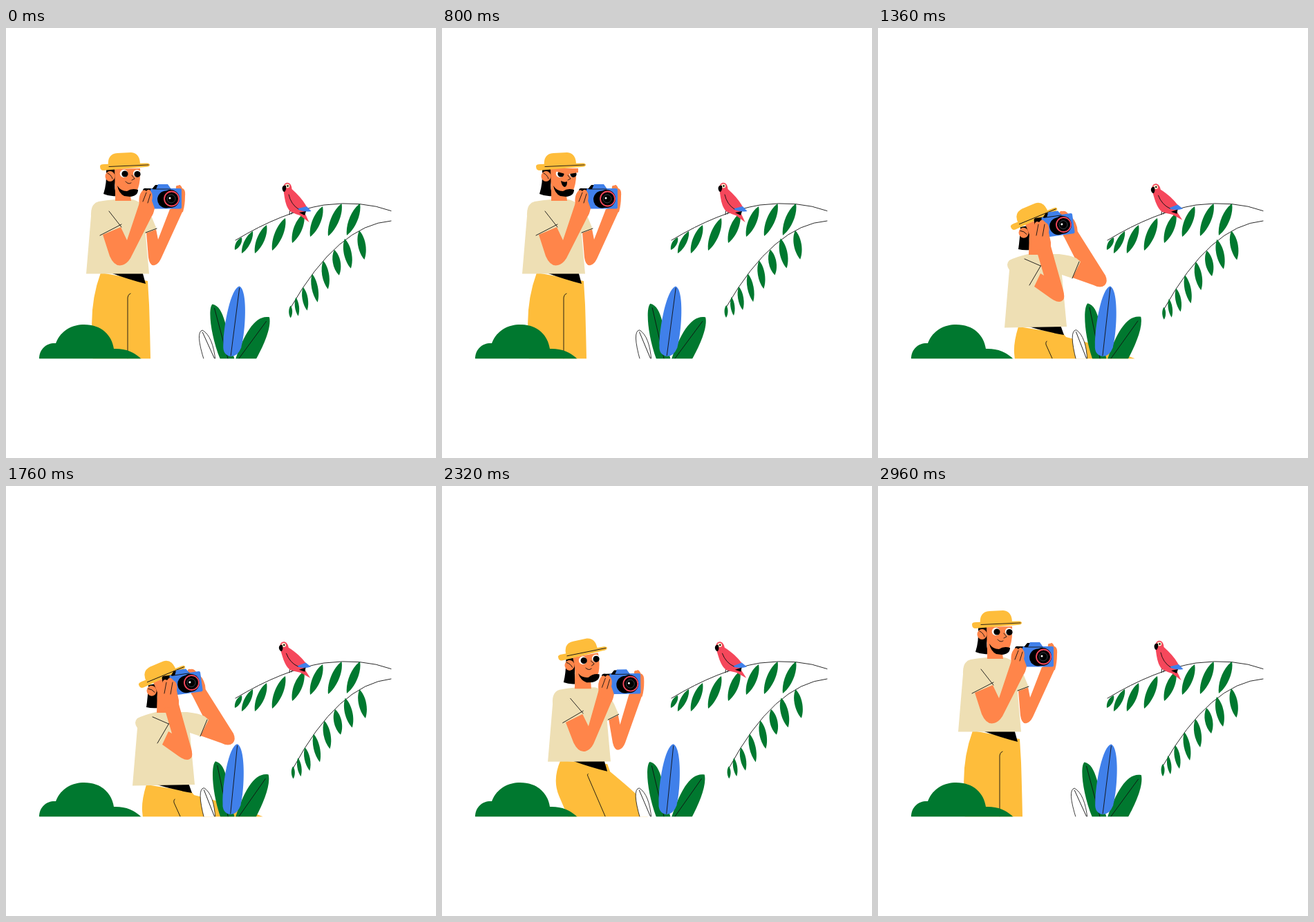
Animation of 622 by 622 pixels, one loop 3040 ms. Source, as an HTML page:

```html
<!DOCTYPE html>
<html lang="en">
<head>
<meta charset="utf-8">
<title>Bird photographer</title>
<style>
html, body { margin: 0; width: 100%; height: 100%; overflow: hidden; background: #fff; }
svg { display: block; width: 100vw; height: 100vh; }
.line { fill: none; stroke: #111; stroke-width: .9; stroke-linecap: round; }
.skin { fill: #ff854a; }
.sun { fill: #febd3b; }
.cream { fill: #eedfb4; }
.green { fill: #00782f; }
.blue { fill: #4080ea; }
.red { fill: #f5475b; }
.white { fill: #fff; }
</style>
</head>
<body>
<svg viewBox="0 0 622 622">
  <defs><clipPath id="ground"><rect width="622" height="478.3"/></clipPath></defs>
  <g clip-path="url(#ground)">
    <g id="person">
      <path id="pants" class="sun"/>
      <path id="pantsLine" class="line"/>
      <path id="belt"/>
      <path id="farArm" class="skin"/>
      <path id="shirt" class="cream"/>
      <path id="farHem" class="line"/>
      <path id="hair"/>
      <path id="neck" class="skin"/>
      <g id="head">
        <path id="face" class="skin"/>
        <ellipse class="skin" cx="150.500" cy="214.500" rx="7" ry="7.500"/>
        <path class="line" d="M147 210Q152 212 154 218"/>
        <g id="features">
          <path d="M161 228Q166 236 175 236Q182 231 191 234Q191 243 179 244L171 243Q163 239 161 228Z"/>
          <g id="eyes">
            <circle class="white" cx="170.500" cy="210.500" r="5.800"/>
            <circle class="white" cx="189.500" cy="210.500" r="5.500"/>
            <circle cx="172" cy="211" r="4.600"/>
            <circle cx="190" cy="211.500" r="4.600"/>
          </g>
          <path id="lids" class="skin" d="M163 203H197V209L185 211L181 210L178 211L163 207Z"/>
          <path class="line" d="M182 213L186 218L182 220"/>
          <path id="smile" class="line" d="M173 222Q177 227 181 224"/>
          <path id="laugh" d="M172 221Q177 224 181 222Q181 230 177 230Q173 228 172 221Z"/>
        </g>
        <path class="sun" d="M148 200Q146 182 161 181L181 180Q194 181 194 198Z"/>
        <path class="sun" d="M136 200Q136 197 142 197L204 195.500Q208 196 208 198Q208 201 201 201L141 206Q136 206 136 200Z"/>
        <path class="line" d="M149 200.500L206 198"/>
      </g>
      <path id="farHand" class="skin"/>
      <g id="camera">
        <path d="M198 234Q199 231 204 232H212V242H198Z"/>
        <rect class="blue" x="209" y="232" width="45" height="29.500" rx="2"/>
        <path d="M211 233L216 227H223V233Z"/>
        <path class="blue" d="M217 233L220 226H234L239 233Z"/>
        <path class="line" d="M213 233H238"/>
        <circle cx="231.500" cy="248" r="12.500"/>
        <circle cx="238" cy="247" r="13"/>
        <circle cx="239.500" cy="247" r="10.500" fill="none" stroke="#f5475b" stroke-width="1.800"/>
        <circle cx="239" cy="247" r="6" fill="none" stroke="#46515c" stroke-width=".8"/>
        <circle class="white" cx="237" cy="246" r="1.500"/>
      </g>
      <path id="nearHem" class="line"/>
      <path id="nearArm" class="skin"/>
      <path id="nearHand" class="skin"/>
      <path id="fingers" class="line"/>
    </g>

    <path class="green" d="M48 479C48 463 60 455 72 456C80 436 97 429 113 429C138 429 153 444 156 464Q180 463 196 479Z"/>

    <g id="paleLeaf">
      <path d="M287 482Q274 439 285 437Q300 446 303 482Z" fill="#fff" stroke="#111" stroke-width=".8"/>
      <path class="line" d="M285 440L301.500 478"/>
    </g>
    <g id="leftLeaf">
      <path class="green" d="M300 399C293 406 297 448 312 484H332C319 440 319 403 300 399Z"/>
      <path class="line" d="M303 405L321 478"/>
    </g>
    <g id="rightLeaf">
      <path class="green" d="M380.500 418C360 414 344 442 331 482H360C371 462 384 434 380.500 418Z"/>
      <path class="line" d="M376 424L337 478"/>
    </g>
    <g id="blueLeaf">
      <path class="blue" d="M336.500 373.500C349 379 346 440 340 462Q335 475 325 475Q313 473 314 459C314 430 324 376 336.500 373.500Z"/>
      <path class="line" d="M336.500 376L325 474"/>
    </g>

    <path class="line" d="M332 307Q400 266 460 256Q515 249 557 264.500"/>
    <g id="upperLeaves" class="green"></g>
    <g id="lowerBranch">
      <path class="line" d="M412 405Q480 285 557 279"/>
      <g id="lowerLeaves" class="green"></g>
    </g>

    <path class="line" d="M411 261L410 270M414 263L413 269"/>
    <g id="bird">
      <path class="red" d="M401 231C402 221 413 221 413.500 233C424 242 432 252 436 261L432 267L438.500 281L425 271Q418 269 411 265C404 258 403 246 401 231Z"/>
      <path class="blue" d="M421 261.500L435 258L441.500 265Q430 267 421 261.500Z"/>
      <path d="M424 267L434 265L432 271Z"/>
      <path class="line" d="M409 241Q412 255 423 262"/>
      <ellipse cx="407" cy="228.500" rx="3.300" ry="3" fill="#fff0d0"/>
      <circle cx="407.500" cy="228.500" r="1.200"/>
      <path d="M405 228Q400 227 399.500 232Q400 237 403 237Q406 234 405 228Z"/>
    </g>
  </g>
</svg>
<script>
const LOOP = 3040, STEP = 80;
const SHIFT = [67, 78]; // how far the body travels from standing to crouching
const el = id => document.getElementById(id);
const clamp = x => Math.min(1, Math.max(0, x));
const ease = x => (x = clamp(x), x < .5 ? 4 * x ** 3 : 1 - 4 * (1 - x) ** 3);
const ramp = (t, from, to) => ease((t - from) / (to - from));
const numbers = d => d.match(/-?[\d.]+/g).map(Number);

// Rewrites each coordinate of a path; x and y alternate.
function remap(path, fn) {
  let i = 0;
  return path.replace(/-?[\d.]+/g, n => fn(+n, i++).toFixed(2));
}

// [standing, crouching]
const armPoses = {
  belt: ['M151 352L197 352L202 370Q178 364 151 354Z',
         'M218 430L264 430L269 444Q245 440 218 432Z'],
  farArm: ['M203 296L206 332Q208 345 215 343Q220 342 224 334L256 264L237 262L220 306L217 291Z',
           'M281 361L312 372Q322 377 328 372Q333 367 329 358L288 293L268 300L291 345L291 340Z'],
  shirt: ['M116 355.500L123 272Q122 254 134 251Q145 249 158 248L183 248Q200 252 211 274L218 291L202 297L202 299L207 355.500Z',
          'M183 433.500L190 350Q184 342 190 336Q200 331 217 327L262 327Q280 329 287 333L293 338L281 362L266 357L273 432Z'],
  farHem: ['M202 296L218 290', 'M281 362L291 338'],
  farHand: ['M237 263Q244 258 245 248L246 233Q245 227 249 228Q252 225 255 232Q260 233 259 243Q259 256 256 266L240 270Z',
            'M268 301Q267 292 266 282L263 269Q262 264 267 265Q272 264 276 270Q285 276 288 288Q289 293 288 296L274 306Z'],
  nearHem: ['M149 265L167 288M136 300L167 284', 'M212 334L235 344M219 372L236 343'],
  nearArm: ['M140 299L150 330Q157 346 168 343Q175 341 180 333L213 268L194 250L175 307L166 288Z',
            'M226 374L250 391Q262 399 267 394Q271 391 268 380L249 312L227 314L240 358L235 355Z'],
  nearHand: ['M193 256Q191 244 196 237Q199 232 203 236Q207 231 210 237Q213 241 211 250L215 261Q214 267 211 272L191 262Z',
             'M226 308Q222 297 226 285Q228 278 233 281Q237 274 242 281Q249 284 247 296L250 310Q250 316 250 320L229 321Z'],
  fingers: ['M198 251L203 238M205 253L209 240', 'M229 300L232 284M238 301L241 284']
};
const headPoses = {
  hair: ['M145 204L161 204L158 222Q156 232 160 243Q150 244 141 240Q146 225 145 204Z',
         'M206 288L222 285L219 300Q218 311 221 321Q211 322 203 320Q205 306 206 288Z'],
  neck: ['M158 225L178 225L181 250L158 250Z', 'M219 295L243 295L243 328L218 328Z']
};
const faces = ['M157 204L194 203Q195 220 191 232Q186 243 176 243L158 240Z',
               'M157 204L194 203Q192 215 185 222Q180 230 170 230L158 232Z'];

const legStops = [0, .33, .55, 1];
const legs = {
  pants: ['M137 354Q122 395 124.500 440L126 490L209 490L209 478Q208 430 207 400L205 366Z',
          'M160 380Q142 412 156 442L180 490L300 490L291 454Q258 430 228 407L225 392Z',
          'M171 397Q159 425 169 448L187 490L300 490L291 456Q278 442 243 413L239 402Z',
          'M203 432Q196 455 197 470L199 490L380 490L371 478Q326 460 272 447L268 442Z'],
  pantsLine: ['M176 478L176 390Q176 386 180 384', 'M225 478L198 406Q195 402 197 401',
              'M236 478L211 420Q209 417 211 416', 'M252 478L243 458Q242 455 244 453']
};

const mix = (a, b, k) => {
  const end = numbers(b);
  return remap(a, (n, i) => n + (end[i] - n) * k);
};

// Almond leaf from stem to tip
function addLeaf(parent, [x1, y1, x2, y2, width]) {
  const dx = x2 - x1, dy = y2 - y1, len = Math.hypot(dx, dy), o = width / 1.5;
  const at = (f, side) => `${x1 + dx * f - side * o * dy / len} ${y1 + dy * f + side * o * dx / len} `;
  const leaf = document.createElementNS('http://www.w3.org/2000/svg', 'path');
  leaf.setAttribute('d', `M${x1} ${y1}C${at(.25, 1)}${at(.72, 1)}${x2} ${y2}C${at(.72, -1)}${at(.25, -1)}${x1} ${y1}Z`);
  el(parent).append(leaf);
}
[[341, 303, 331, 321, 7], [357, 294, 341, 326, 9], [377, 285, 360, 326, 11], [404, 275, 385, 322, 12],
 [431, 268, 414, 311, 12], [458, 258, 440, 302, 12], [485.500, 254, 466, 301, 12], [512, 254, 493, 300, 12]]
  .forEach(leaf => addLeaf('upperLeaves', leaf));
[[412, 402, 412, 420, 5], [419.500, 390, 423, 417, 6], [430, 375, 436, 409, 8], [443, 356, 451, 397, 9],
 [459, 337, 466, 378, 10], [475, 321, 482, 358, 11], [490, 305, 499, 348, 11], [511, 293, 518.500, 335, 11]]
  .forEach(leaf => addLeaf('lowerLeaves', leaf));

const move = (id, value) => el(id).setAttribute('transform', value);
const show = (id, on) => el(id).setAttribute('visibility', on ? 'inherit' : 'hidden');
const wave = (t, start) => Math.cos(2 * Math.PI * (t - start) / LOOP);

// Carries every part along with the body, then bends it by k into its crouching pose.
function pose(parts, crouch, k) {
  for (const [id, [stand, low]] of Object.entries(parts)) {
    const end = numbers(low);
    el(id).setAttribute('d', remap(stand, (n, i) => {
      const d = SHIFT[i % 2];
      return n + d * crouch + (end[i] - n - d) * k;
    }));
  }
}

function drawPerson(t) {
  const crouch = ramp(t, 805, 1345) - ramp(t, 2060, 2600);
  const lift = ramp(t, 920, 1350) - ramp(t, 1980, 2460);
  const tilt = clamp((crouch - .33) / .5);
  pose(armPoses, crouch, lift);
  pose(headPoses, crouch, tilt);

  const i = crouch < .33 ? 0 : crouch < .55 ? 1 : 2;
  const part = (crouch - legStops[i]) / (legStops[i + 1] - legStops[i]);
  for (const id in legs) el(id).setAttribute('d', mix(legs[id][i], legs[id][i + 1], part));

  const [x, y] = SHIFT.map(d => d * crouch);
  move('head', `translate(${x - 7 * tilt} ${y + 4 * tilt}) rotate(${-20 * tilt} 150 214)`);
  move('camera', `translate(${x - 38 * lift} ${y - 40 * lift}) rotate(${-8 * lift} 236 247)`);
  el('face').setAttribute('d', mix(...faces, lift));

  const laughing = t >= 240 && t < 1300;
  show('features', lift < .6);
  show('lids', t >= 800 && t < 1300);
  show('laugh', laughing);
  show('smile', !laughing);
}

function draw(t) {
  drawPerson(t);
  const sway = wave(t, 480), lag = wave(t, 3000);
  move('lowerBranch', `rotate(${sway * 1.1 - .45} 557 279)`);
  move('blueLeaf', `rotate(${sway * 1.1} 326 490)`);
  move('rightLeaf', `rotate(${sway * .9} 340 478)`);
  move('leftLeaf', `rotate(${.6 - lag * 1.7} 320 482)`);
  move('paleLeaf', `rotate(${.6 - lag * 1.6} 295 480)`);
  const lean = ramp(t, 1080, 1340) - ramp(t, 2480, 2760);
  move('bird', `translate(0 ${-2 * lean}) rotate(${-8 * lean} 430 268)`);
}

function tick(now) {
  draw(Math.floor(now % LOOP / STEP) * STEP);
  requestAnimationFrame(tick);
}
draw(0);
requestAnimationFrame(tick);
</script>
</body>
</html>
```
